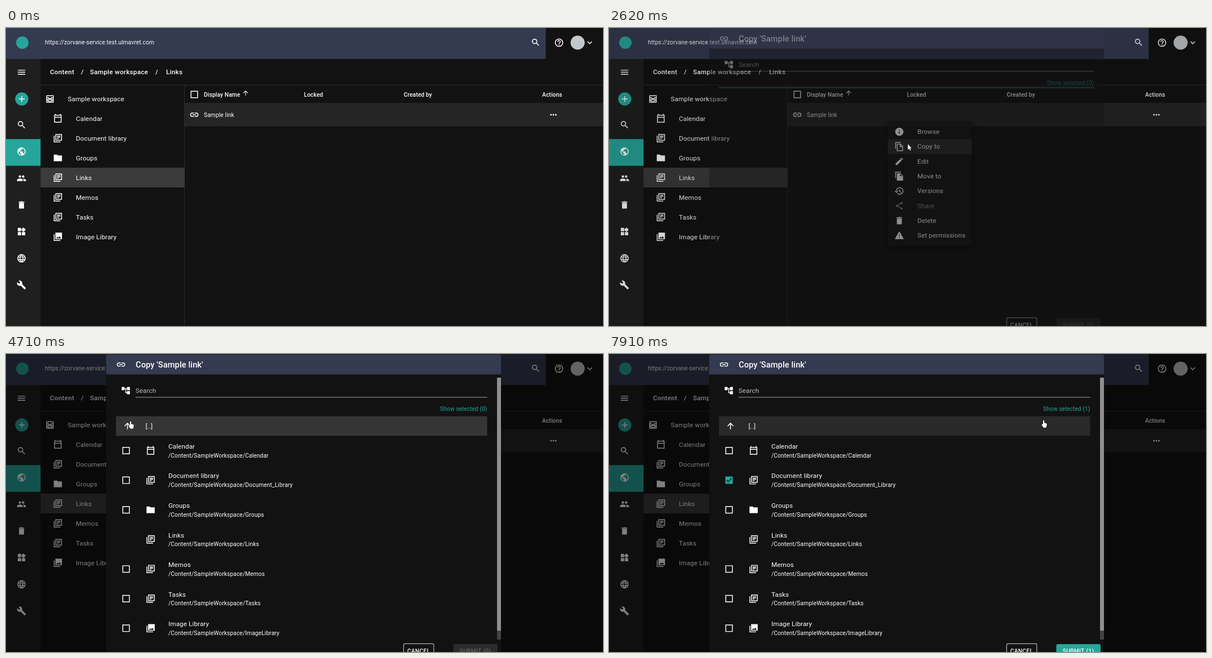
Animation, 1059 px wide and 529 px high, one loop 7.99 s. Source, as an HTML page with a canvas:

```html
<!DOCTYPE html>
<html lang="en">
<head>
<meta charset="utf-8">
<title>Copy a link</title>
<style>
  html, body { margin: 0; width: 100%; height: 100%; overflow: hidden; background: #121212; }
  canvas { display: block; }
</style>
</head>
<body>
<canvas id="stage" width="1059" height="529"></canvas>
<script>
const W = 1059, H = 529, LOOP = 7990;
const WHITE = '#fff', TEAL = '#26a69a', BG = '#121212', NAVY = '#343a50', HOVER = '#292929', RULE = '#2c2c2c';
const BODY = 11.68, SMALL = 10.22, ICON = 17.5;

const stage = document.getElementById('stage');
const pad = document.createElement('canvas');
pad.width = W;
pad.height = H;
const padCtx = pad.getContext('2d');
let g = stage.getContext('2d');

// Icons on a 24 unit grid.
const LINES = {
  menu: 'M3 7h18M3 12h18M3 17h18',
  add: 'M12 5v14M5 12h14',
  search: 'M9.5 4a5.5 5.5 0 1 0 .01 0zM14 14l6 6',
  language: 'M12 3a9 9 0 1 0 .01 0zM12 3c-5 5-5 13 0 18c5-5 5-13 0-18M4 9h16M4 15h16',
  help: 'M12 3a9 9 0 1 0 .01 0zM9 10a3 3 0 1 1 5 2q-2 1-2 3M12 16v2',
  expand: 'M6.7 9.3l5.3 5.3 5.3-5.3',
  calendar: 'M4 4h16v17H4zM4 9h16M6 1v3M18 1v3',
  books: 'M7 3h14v14H7zM3 6v15h15M10 7h8M10 10h8M10 13h4',
  inbox: 'M4 4h16v16H4zM4 9h5q0 3 3 3t3-3h5M4 13h16M4 16h5q0 3 3 3t3-3h5',
  link: 'M11 8H7a4 4 0 0 0 0 8h4M13 8h4a4 4 0 0 1 0 8h-4M8 12h8',
  box: 'M4 4h16v16H4z',
  up: 'M5 12l7-7 7 7M12 5v15',
  copy: 'M3 17V2h13M7 6h8l5 5v11H7zM14 6v6h6',
  history: 'M5 12a8 8 0 1 1 2.4 5.6M1.5 12l3.5 3.5L8.5 12M12.5 8v5l4 2.4',
  share: 'M18 5L6 12l12 7M18 3.5a1.5 1.5 0 1 0 .01 0zM6 10.5a1.5 1.5 0 1 0 .01 0zM18 17.5a1.5 1.5 0 1 0 .01 0z'
};
const SOLIDS = {
  globe: 'M12 2a10 10 0 1 0 .01 0zM4.2 10.2L9 15v1l2 2v2Q4 19 4.2 10.2zM15 4.6Q20 7 20 12q0 3-2.1 5.4L16 16h-1v-4H8v-2h3V7h2l2-2z',
  people: 'M8 5a3 3 0 1 0 .01 0zM16 5a3 3 0 1 0 .01 0zM1 19v-2.5q1-3 7-3.5t7 3.5V19zM17 19h6v-2.5q-1-3-8-3.4 2 1.5 2 3.4z',
  bin: 'M6 7h12v14H6zM5 4h4l1-1h4l1 1h4v2H5z',
  widgets: 'M13 13h8v8h-8zM3 13h8v8H3zM3 3h8v8H3zM16.7 1.7l5.6 5.6-5.6 5.7L11 7.3z',
  wrench: 'M9 6L6 9 1.6 4.7Q0 9 2.9 12.1 6 15 9.8 13.6L19.5 23 23 19.6 13.6 9.9Q15 6 12 3 9 0 4.7 1.7z',
  folder: 'M2 4h8l2 2h10v14H2z',
  photos: 'M6 2h16v16H6zM2 6h2v14h14v2H2zM8 16h12l-4-5-3 3.7-2-2.7z',
  more: 'M6 10a2 2 0 1 0 .01 0zM12 10a2 2 0 1 0 .01 0zM18 10a2 2 0 1 0 .01 0z',
  checked: 'M3 3h18v18H3zM10 17l9-9-1.4-1.4-7.6 7.6-3.6-3.6L5 12z',
  tree: 'M2 3h7v3h6V3h7v8h-7V8h-2v8h2v-3h7v8h-7v-3h-4V8H9v3H2z',
  info: 'M12 2a10 10 0 1 0 .01 0zM11 7h2v2h-2zM11 11h2v6h-2z',
  move: 'M2 1h14v2H4v14H2zM6 5h9l6 6v12H6zM14 6.5V12h5.5z',
  edit: 'M3 17.2V21h3.8L17.8 10 14 6.2zM15 5l3.8 3.8L21 6.4 17.6 3z',
  warning: 'M1 21h22L12 2zM11 10h2v4h-2zM11 16h2v2h-2z'
};
const HAND = new Path2D('M3.2 7V1.6a1.1 1.1 0 0 1 2.2 0V5l3.4 1q1.3.3 1.2 1.6l-.4 3.6-1 2.6H4.2L1 9.6q-.7-1.2.6-1.6z');
const ARROW = new Path2D('M0 0V10L2.3 8 4 11.6 5.6 11 4 7.4H7z');

const SIDEBAR = ['search', 'globe', 'people', 'bin', 'widgets', 'language', 'wrench'];
const LISTS = [['calendar', 'Calendar'], ['books', 'Document library', 'Document_Library'], ['folder', 'Groups'],
  ['books', 'Links'], ['books', 'Memos'], ['books', 'Tasks'], ['photos', 'Image Library', 'ImageLibrary']];
const ACTIONS = [['info', 'Browse'], ['copy', 'Copy to'], ['edit', 'Edit'], ['move', 'Move to'],
  ['history', 'Versions'], ['share', 'Share'], ['bin', 'Delete'], ['warning', 'Set permissions']];

// Pointer moves: start, end, place reached.
const MOVES = [[270, 930, 497, 163], [1480, 1730, 509, 180], [1820, 2360, 530, 206], [3440, 4050, 221, 119],
  [5310, 5720, 231, 235], [6020, 6440, 218, 225], [6910, 7610, 676, 138], [7760, 7910, 771, 117]];

const OPEN_MENU = 1270, OPEN_DIALOG = 2500, LISTED = 2915;
const GO_UP = 4285, PARENT_LISTED = 4540, TICK = 6620;

const clamp = k => Math.max(0, Math.min(1, k));
const ramp = (t, from, to) => clamp((t - from) / (to - from));
const smooth = k => k * k * (3 - 2 * k);

function pointerAt(t) {
  let x = 560, y = 366;
  for (const [from, to, toX, toY] of MOVES) {
    const k = smooth(ramp(t, from, to));
    x += (toX - x) * k;
    y += (toY - y) * k;
  }
  return [x, y];
}

function rect(x, y, w, h, color) {
  g.fillStyle = color;
  g.fillRect(x, y, w, h);
}

function disc(x, y, r, color) {
  g.fillStyle = color;
  g.beginPath();
  g.arc(x, y, r, 0, 7);
  g.fill();
}

function rounded(x, y, w, h, r, color) {
  g.beginPath();
  g.roundRect(x, y, w, h, r);
  g.fillStyle = color;
  g.fill();
}

// y is the middle of the capitals; the baseline falls on a whole pixel.
function text(s, x, y, size = BODY, { color = WHITE, weight = 400, track = .11, align = 'left' } = {}) {
  g.font = `${weight} ${size}px Roboto, sans-serif`;
  g.letterSpacing = track + 'px';
  g.textAlign = align;
  g.fillStyle = color;
  g.fillText(s, x, Math.round(y + size * .355 - .2));
}

function icon(name, x, y, size = ICON, color = WHITE) {
  g.save();
  g.translate(x - size / 2, y - size / 2);
  g.scale(size / 24, size / 24);
  g.strokeStyle = g.fillStyle = color;
  g.lineWidth = 2;
  if (LINES[name]) g.stroke(new Path2D(LINES[name]));
  else g.fill(new Path2D(SOLIDS[name]), 'evenodd');
  g.restore();
}

function layer(alpha, draw) {
  if (alpha <= 0) return;
  const main = g;
  g = padCtx;
  g.clearRect(0, 0, W, H);
  draw();
  g = main;
  g.globalAlpha = alpha;
  g.drawImage(pad, 0, 0);
  g.globalAlpha = 1;
}

// A growing disc clipped to its row; returns how much of it is left.
function ripple(age, x, y, box) {
  const left = age < 0 ? 0 : 1 - ramp(age, 260, 520);
  g.save();
  g.beginPath();
  g.rect(...box);
  g.clip();
  if (left) disc(x, y, 1.63 * age, `rgba(255,255,255,${.155 * left})`);
  g.restore();
  return left;
}

function drawPage(rowHover) {
  rect(0, 0, W, H, BG);
  rect(0, 0, 957.5, 55, NAVY);
  rect(0, 55, 61.3, H - 55, '#1f1f1f');
  disc(29, 26, 11, TEAL);
  text('https://zorvane-service.test.ulmavret.com', 69, 26, SMALL);
  icon('search', 939.5, 25.5);
  icon('help', 981, 26);
  disc(1014, 26, 12.5, '#c3c8cb');
  icon('expand', 1035.5, 26);

  rect(0, 197.2, 61.3, 47.4, TEAL);
  icon('menu', 27.5, 78.5);
  disc(28, 126, 11.7, TEAL);
  icon('add', 28, 126);
  SIDEBAR.forEach((name, i) => icon(name, 27.5, 171.8 + i * 47.4));

  const crumb = { weight: 500, track: .25 };
  text('Content', 78, 78.5, BODY, crumb);
  text('/', 133, 78.5, BODY, crumb);
  text('Sample workspace', 149, 78.5, BODY, crumb);
  text('/', 265, 78.5, BODY, crumb);
  text('Links', 284, 78.5, BODY, crumb);
  rect(61, 101, W - 61, 1, RULE);
  rect(316, 101, 1, H - 101, RULE);

  rect(61.3, 248, 255.7, 35, '#3b3b3b');
  icon('inbox', 78, 126);
  text('Sample workspace', 109.5, 126);
  LISTS.forEach(([name, label], i) => {
    const y = 160.6 + i * 35;
    icon(name, 92, y);
    text(label, 124, y);
  });

  const head = { weight: 500 };
  icon('box', 334, 118);
  text('Display Name', 351, 118.5, SMALL, head);
  icon('up', 425, 115.5, 13);
  text('Locked', 528.5, 118.5, SMALL, head);
  text('Created by', 705.5, 118.5, SMALL, head);
  text('Actions', 951, 118.5, SMALL, head);
  rect(317, 133, W - 317, 41.5, rowHover ? '#2e2e2e' : '#252525');
  icon('link', 334, 154);
  text('Sample link', 351, 154.3, SMALL);
  icon('more', 971, 154);
}

function drawMenu(grow, hovered) {
  g.save();
  g.translate(495, 165);
  g.scale(.75 + .25 * grow, .5 + .5 * grow);
  g.translate(-495, -165);
  g.shadowColor = 'rgba(0,0,0,.5)';
  g.shadowBlur = 8;
  g.shadowOffsetY = 3;
  rounded(494.5, 165, 149, 221.5, 3, '#131313');
  g.shadowColor = 'transparent';
  ACTIONS.forEach(([name, label], i) => {
    const y = 184.2 + i * 26.28;
    const color = label === 'Share' ? '#868686' : WHITE;
    if (i === hovered) rect(494.5, y - 13.1, 149, 26.3, HOVER);
    icon(name, 515, y, ICON, color);
    text(label, 547, y, BODY, { color });
  });
  g.restore();
}

function drawItem(name, title, path, y) {
  icon(name, 256.5, y);
  text(title, 288, y - 7.5);
  text('/Content/SampleWorkspace/' + path, 288, y + 8.7, SMALL);
}

function drawDialog(t, py) {
  const inParent = t >= PARENT_LISTED, checked = t >= TICK + 40, count = checked ? 1 : 0;
  const right = inParent ? 853.5 : 860.5, width = right - 195;
  const rowTop = i => 145.2 + i * 52.55;
  const upRow = [195, 110.4, width, 34.8], loading = t < LISTED || (t >= GO_UP + 95 && !inParent);

  rounded(177.5, 1, 700.5, H, 3, BG);
  rounded(177.5, 1, 700.5, 35.3, [3, 3, 0, 0], NAVY);
  icon('link', 204, 18.7);
  text("Copy 'Sample link'", 230, 19, 14.6, { weight: 500 });
  icon('tree', 212.5, 65);
  text('Search', 229.7, 65, BODY, { color: '#bcbcbc' });
  rect(230, 76.4, right - 230, .9, '#b0b0b0');
  text(`Show selected (${count})`, right, 97.5, SMALL, { color: TEAL, align: 'right' });
  if (loading) rect(195, 104.3, width, 2.9, '#17655d');

  if (t >= LISTED) {
    const row = Math.floor((py - rowTop(0)) / 52.55);
    if (py >= 110 && row < 0) rect(...upRow, HOVER);
    if (row >= 0 && row < (inParent ? LISTS.length : 1)) rect(195, rowTop(row), width, 52.55, HOVER);
    ripple(t - GO_UP, 221, 119, upRow);
    const halo = ripple(t - TICK, 213, 224, [195, rowTop(1), width, 52.55]);
    disc(213, 224, 15, `rgba(38,120,112,${.28 * halo})`);

    icon('up', 215.5, 128);
    text('[..]', 247.5, 128.3);
    if (inParent) {
      LISTS.forEach(([name, title, path = title], i) => {
        const y = rowTop(i) + 26.3, on = checked && i === 1;
        if (title !== 'Links') icon(on ? 'checked' : 'box', 213, y, ICON, on ? TEAL : WHITE);
        drawItem(name, title, path, y);
      });
      rect(871, 42, 7, 465, '#424242');
      rect(871, 42, 7, 449, '#8f8f8f');
    } else {
      drawItem('link', 'Sample link', 'Links/SampleLink', rowTop(0) + 26.3);
    }
  }

  const button = { weight: 500, track: .29, align: 'center' };
  rounded(704.8, 513.8, 54.6, 27, 3, '#d8d8d8');
  rounded(705.8, 514.8, 52.6, 25, 2, BG);
  text('CANCEL', 732, 527.5, SMALL, button);

  rounded(793.5, 515, 78.5, 26, 3, '#2b2b2b');
  g.globalAlpha = ramp(t, TICK, TICK + 260);
  rounded(793.5, 515, 78.5, 26, 3, TEAL);
  g.globalAlpha = 1;
  text(`SUBMIT (${count})`, 832.5, 527.5, SMALL, { ...button, color: checked ? WHITE : '#626262' });
}

function drawPointer(x, y, hand) {
  const shape = hand ? HAND : ARROW;
  g.save();
  g.translate(hand ? x - 4.3 : x, y);
  g.fillStyle = WHITE;
  g.strokeStyle = '#000';
  g.lineWidth = 1;
  g.lineJoin = 'round';
  g.stroke(shape);
  g.fill(shape);
  g.restore();
}

function draw(t) {
  const [x, y] = pointerAt(t);
  const opened = ramp(t, OPEN_MENU - 20, OPEN_MENU + 230);
  const started = ramp(t, OPEN_DIALOG, OPEN_DIALOG + 110), finished = ramp(t, 2710, 3060);

  drawPage(t >= 270 && t < OPEN_MENU && y < 174);
  rect(0, 0, W, H, `rgba(0,0,0,${.5 * opened - .33 * started + .33 * finished})`);
  const hovered = t > 1820 ? Math.floor((y - 171) / 26.28) : -1;
  layer(opened - .15 * started - .85 * ramp(t, 2710, 2850), () => drawMenu(opened, hovered));
  layer(.38 * started + .62 * finished, () => drawDialog(t, y));

  const hand = (t > 1500 && t < OPEN_DIALOG) || (t > 3440 && y < 198) || t > GO_UP;
  if (t >= 270) drawPointer(x, y, hand);
}

const start = performance.now();
function tick() {
  draw((performance.now() - start) % LOOP);
  requestAnimationFrame(tick);
}
tick();
</script>
</body>
</html>
```
